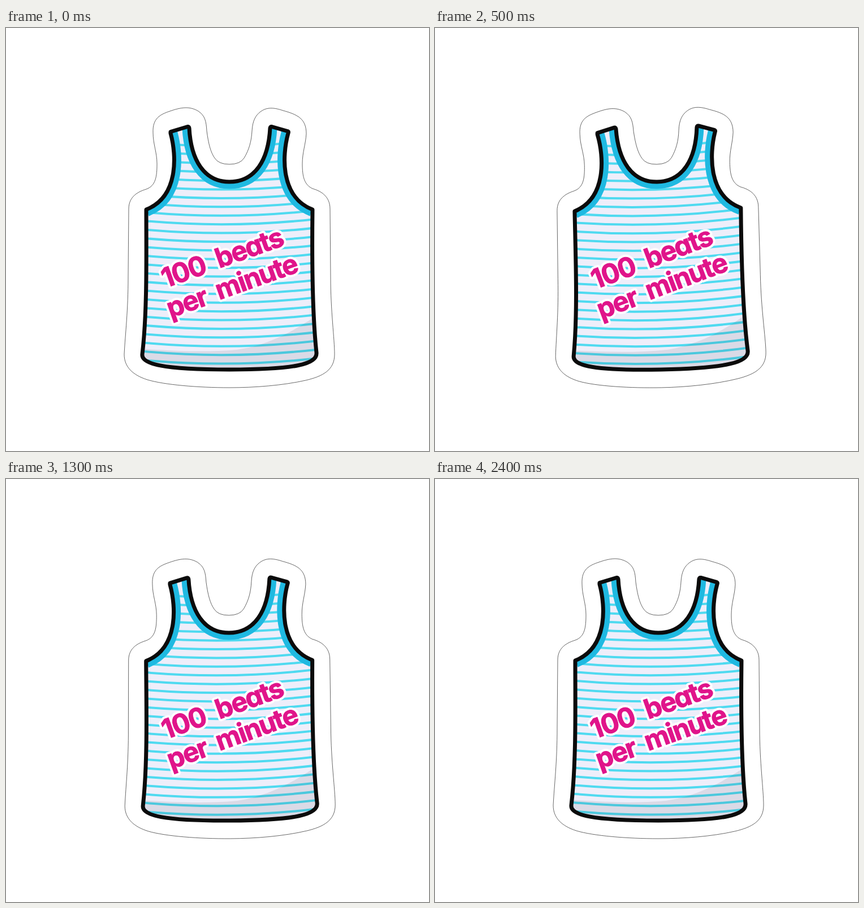
Animation of 748x748 px, one loop 2.5 s. Source, as an HTML page:

```html
<!DOCTYPE html>
<html lang="en">
<head>
<meta charset="utf-8">
<title>Swinging tank top</title>
<style>
  html, body { margin: 0; width: 100%; height: 100%; overflow: hidden; background: #fff; }
  svg { display: block; width: 100vw; height: 100vh; }
  .lettering { font: 700 48px Inter, "Open Sans", sans-serif; font-feature-settings: "cv11"; letter-spacing: -2px; stroke-linejoin: round; }
</style>
</head>
<body>
<svg viewBox="0 0 748 748" fill="none">
  <defs>
    <path id="body" d="M291 183.500 L321 174.500 Q323.500 174 324 177 C327 233 350 272 395 272 C441 272 464 233 467 177 Q467.500 174 470 174.500 L498 182.500 Q500 183.500 499 186 C488 226 485 299 542 321 C541 400 541 500 549 574 C551 594 513 604 395 604 C277 604 239 594 241 577 C250 500 248 400 248 321 C305 299 302 226 291 186 Z"/>
    <clipPath id="inside"><use href="#body"/></clipPath>
    <g id="words">
      <text transform="translate(282 460) rotate(-19.5)">100</text>
      <text transform="translate(377 425) rotate(-19.5)">beats</text>
      <text transform="translate(291 513) rotate(-19.5)">per</text>
      <text transform="translate(377 481) rotate(-19.5)">minute</text>
    </g>
  </defs>
  <g id="shirt">
    <path id="cutline" fill="#fff" stroke="#000" stroke-width=".6" d="M260 185 C259 160 272 153 290 147 C310 140 325 138 340 147 C352 155 354 165 355 182 C358 205 362 220 369 230 Q376 241 395 241 Q414 241 421 230 C430 215 434 200 435 182 C436 163 442 154 450 148 C462 139 475 141 490 146 C515 153 531 160 531 187 C530 205 524 220 524 240 C524 262 527 277 542 284 C556 288 573 297 573 320 L574 440 C574 500 581 550 581 577 C581 605 560 616 530 623 C490 632 440 636 395 636 C340 636 280 631 250 622 C225 614 209 600 209 577 C211 540 216 500 216 440 L217 320 C217 297 235 289 248 285 C265 279 267 262 267 240 C267 220 260 205 260 185 Z"/>
    <g clip-path="url(#inside)">
      <use href="#body" fill="#eeeefa"/>
      <path id="stripes" stroke="#4fdaf0" stroke-width="4"/>
      <path fill="#282d32" fill-opacity=".1" d="M235 567 C300 571 350 574 408 569 C465 561 510 535 550 508 V610 H235 Z"/>
      <path stroke="#1fb9e1" stroke-width="25" d="M324 170 V177 C327 233 350 272 395 272 C441 272 464 233 467 177 V170 M499 180 V186 C488 226 485 299 542 321 M291 180 V186 C302 226 305 299 248 321"/>
    </g>
    <use href="#body" stroke="#0b0b0b" stroke-width="7" stroke-linejoin="round"/>
    <g class="lettering">
      <use href="#words" fill="#fff" stroke="#fff" stroke-width="9"/>
      <use href="#words" fill="#e0148a" stroke="#e0148a" stroke-width="1"/>
    </g>
  </g>
</svg>
<script>
  const LOOP = 2500, STEP = 100, PERIOD = 480, PEAK = 399.5;
  const shirt = document.getElementById("shirt");

  // Evenly spaced stripes that sag in the middle; the top ones only show on the straps.
  document.getElementById("stripes").setAttribute("d",
    Array.from({ length: 26 }, (_, i) => {
      const y = 208.5 + 15.4 * i;
      return `M235 ${y - 7} Q395 ${y + 8.5} 555 ${y - 10}`;
    }).join(""));

  // Damped swing in degrees, counterclockwise positive; it starts from rest.
  function swing(ms) {
    if (ms < STEP) return 0;
    const t = ms - PEAK;
    return 6.2 * 0.75 ** (t / 100) * Math.cos(2 * Math.PI * t / PERIOD);
  }

  function draw(now) {
    const ms = Math.floor(now % LOOP / STEP) * STEP;
    shirt.setAttribute("transform", `rotate(${-swing(ms)} 395 374)`);
    requestAnimationFrame(draw);
  }
  draw(performance.now());
</script>
</body>
</html>
```
